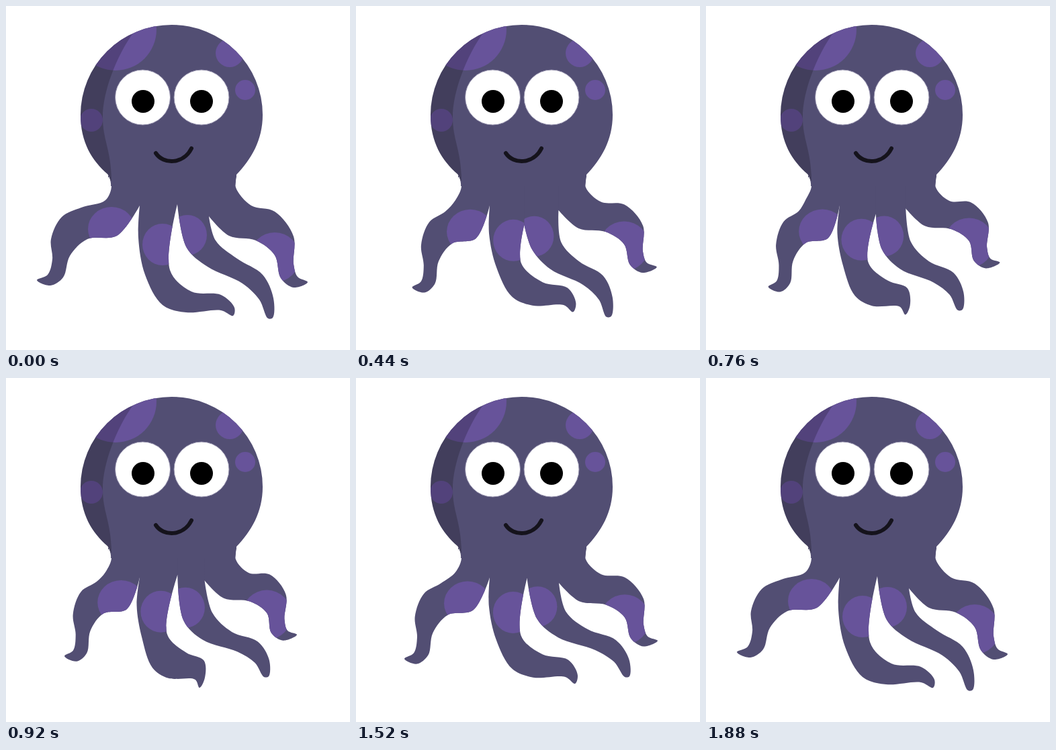
Write an HTML page that moves like this. It is 512x512 px and loops after 1.92 s.

```html
<!DOCTYPE html>
<html lang="en">
<head>
<meta charset="utf-8">
<title>Octopus</title>
<style>
  html, body { margin: 0; width: 100%; height: 100%; overflow: hidden; background: #fff; }
  svg { display: block; width: 100%; height: 100%; }
  .skin { fill: #524e73; }
  .spot { fill: #67539a; }
</style>
</head>
<body>
<svg viewBox="0 0 512 512">
  <defs>
    <clipPath id="headClip">
      <path id="head" d="M111 162A135.5 134 0 0 1 382 162C382 200 365 228 343 251L341 268H156Q157 258 151 250C128 230 111 203 111 162Z"/>
    </clipPath>
  </defs>
  <path id="torso" class="skin"/>
  <g id="limbs"></g>
  <use href="#head" class="skin"/>
  <g clip-path="url(#headClip)">
    <g class="spot">
      <circle cx="163" cy="35" r="61"/>
      <circle cx="127" cy="170" r="17"/>
      <circle cx="333" cy="70" r="21"/>
      <circle cx="356" cy="125" r="15"/>
    </g>
    <path d="M190 39C164 75 144 128 144 165C144 200 157 215 157 260H100V20Z" opacity=".2"/>
  </g>
  <g fill="#fff" stroke="#8d89a6">
    <circle cx="203.5" cy="136" r="41"/>
    <circle cx="291" cy="136" r="41"/>
  </g>
  <circle cx="204" cy="142" r="17"/>
  <circle cx="291" cy="142" r="17"/>
  <path d="M223 219C234 236 264 236 276 212" fill="none" stroke="#15131c" stroke-width="6" stroke-linecap="round"/>
</svg>
<script>
const LOOP = 1920, STEP = 40, PERIOD = 1880;
const KEYS = [0, 280, 600, 920, 1240, 1520];
const FORK_LEFT = [199, 297], FORK_MID = [255, 295];
const FORK_DIP = [0, 23, 31, -2, 3, 3];

// Each limb is one resting outline, warped by the travel of its tip and middle.
// root: where the warp is zero; bend: how far along the limb its middle lies.
const outerLeft = {
  shape: 'M112 300 83 314 67 347 69 377 62 400 46 408 66 416 85 404 95 372 121 347 165 342 199 297',
  root: FORK_LEFT, reach: 189, bend: .5, spot: [157, 332, 35, 33],
  tip: { x: [0, 23, 48, 41, 32, 26], y: [0, 7, 13, 6, 5, 10] }
};
const innerLeft = {
  shape: 'M197 345 207 400 233 445 268 456 320 453 338 461 340 449 320 430 276 425 244 393',
  root: [225, 297], reach: 199, bend: .68, spot: [233, 355, 30, 31],
  tip: { x: [0, -5, -27, -50, -27, -12], y: [0, -6, -4, 0, -5, -6] },
  middle: { x: [0, 4, 0, -6, 1, 2], y: [0, -11, -16, -17, -18, -14] }
};
const innerRight = {
  shape: 'M269 360 300 388 352 413 377 437 390 465 397 464 398 435 382 400 344 376 312 349',
  root: [280, 305], reach: 194, bend: .5, spot: [270, 341, 29, 30],
  tip: { x: [0, -10, -21, -6, 11, 10], y: [0, -1, -5, -20, -29, -20] },
  middle: { x: [0, -7, -15, -8, -1, 1], y: [0, 3, 5, 2, -3, -2] }
};
const outerRight = {
  shape: 'M365 297 400 306 428 343 428 384 434 403 449 411 428 419 409 405 400 371 372 349 332 342 302 313',
  root: [342, 270], reach: 177, bend: .5, spot: [400, 374, 37, 37],
  tip: { x: [0, 1, -5, -16, -4, 0], y: [0, -15, -28, -29, -31, -20] }
};
const limbs = [outerLeft, innerLeft, innerRight, outerRight];

const byId = id => document.getElementById(id);
function add(parent, tag, attrs = {}) {
  const el = document.createElementNS('http://www.w3.org/2000/svg', tag);
  for (const name in attrs) el.setAttribute(name, attrs[name]);
  return parent.appendChild(el);
}

limbs.forEach((limb, i) => {
  const group = byId('limbs');
  limb.points = limb.shape.match(/\d+ \d+/g).map(pair => pair.split(' ').map(Number));
  const clip = add(add(group, 'clipPath', { id: 'limb' + i }), 'path');
  limb.paths = [clip, add(group, 'path', { class: 'skin' })];
  const holder = add(group, 'g', { 'clip-path': `url(#limb${i})` });
  const [, , rx, ry] = limb.spot;
  limb.ellipse = add(holder, 'ellipse', { class: 'spot', rx, ry });
});

// Smooth cyclic interpolation of values given at the key times.
function keyed(values, t) {
  const n = KEYS.length;
  const value = k => values[(k + n) % n];
  const time = k => KEYS[(k + n) % n] + Math.floor(k / n) * PERIOD;
  let k = n - 1;
  while (KEYS[k] > t) k--;
  const span = time(k + 1) - time(k), s = (t - time(k)) / span;
  const slope = j => (value(j + 1) - value(j - 1)) / (time(j + 1) - time(j - 1)) * span;
  return value(k) + (value(k + 1) - value(k)) * s * s * (3 - 2 * s)
    + slope(k) * s * (1 - s) ** 2 - slope(k + 1) * s * s * (1 - s);
}

// Returns a function that moves a resting point of the limb to its place at t.
function warpAt({ root, reach, bend, tip, middle }, t) {
  const travel = m => [keyed(m.x, t), keyed(m.y, t)];
  const end = travel(tip);
  const mid = middle ? travel(middle) : end.map(v => v * .6);
  return p => {
    const u = Math.min(1, Math.hypot(p[0] - root[0], p[1] - root[1]) / reach);
    return p.map((v, i) => v + (u < bend
      ? mid[i] * u / bend
      : mid[i] + (end[i] - mid[i]) * (u - bend) / (1 - bend)));
  };
}

// Bezier handle beside p, looking from prev towards next (centripetal spline).
function handle(prev, p, next) {
  const root = (a, b) => Math.sqrt(Math.hypot(a[0] - b[0], a[1] - b[1]));
  const d = root(prev, p), e = root(p, next);
  if (!d) return p;
  return p.map((v, i) => (d * d * next[i] - e * e * prev[i] + (2 * d * d + 3 * d * e + e * e) * v) / (3 * d * (d + e)));
}

const fmt = p => p.map(v => v.toFixed(2)).join(' ');
function curve(pts) {
  let d = 'M' + fmt(pts[0]);
  for (let i = 1; i < pts.length; i++) {
    const a = pts[i - 1], b = pts[i];
    d += 'C' + [handle(pts[i - 2] || a, a, b), handle(pts[i + 1] || b, b, a), b].map(fmt).join(' ');
  }
  return d;
}

function draw(t) {
  const warps = limbs.map(limb => warpAt(limb, t));
  const [a, b, c, d] = limbs.map((limb, i) => limb.points.map(warps[i]));
  const dip = keyed(FORK_DIP, t);
  const forkMid = [FORK_MID[0] - dip * .15, FORK_MID[1] + dip];
  const forkRight = d.at(-1);
  const outlines = [
    [[152, 251], [157, 268], [148, 289], ...a],
    [FORK_LEFT, ...b, forkMid],
    [forkMid, ...c, forkRight],
    [[343, 251], [342, 270], ...d]
  ];
  limbs.forEach(({ paths, spot, ellipse }, i) => {
    const path = `${curve(outlines[i])}V255H${outlines[i][0][0].toFixed(2)}Z`;
    paths.forEach(el => el.setAttribute('d', path));
    const [cx, cy] = warps[i](spot.slice(0, 2));
    ellipse.setAttribute('cx', cx.toFixed(2));
    ellipse.setAttribute('cy', cy.toFixed(2));
  });
  const base = [[155, 252], [157, 268], FORK_LEFT, forkMid, forkRight, [341, 268], [343, 250]];
  byId('torso').setAttribute('d', 'M' + base.map(fmt).join('L') + 'Z');
}

const start = performance.now();
function tick() {
  const t = (performance.now() - start) % LOOP;
  draw(Math.floor(t / STEP) * STEP % PERIOD);
  requestAnimationFrame(tick);
}
tick();
</script>
</body>
</html>
```
